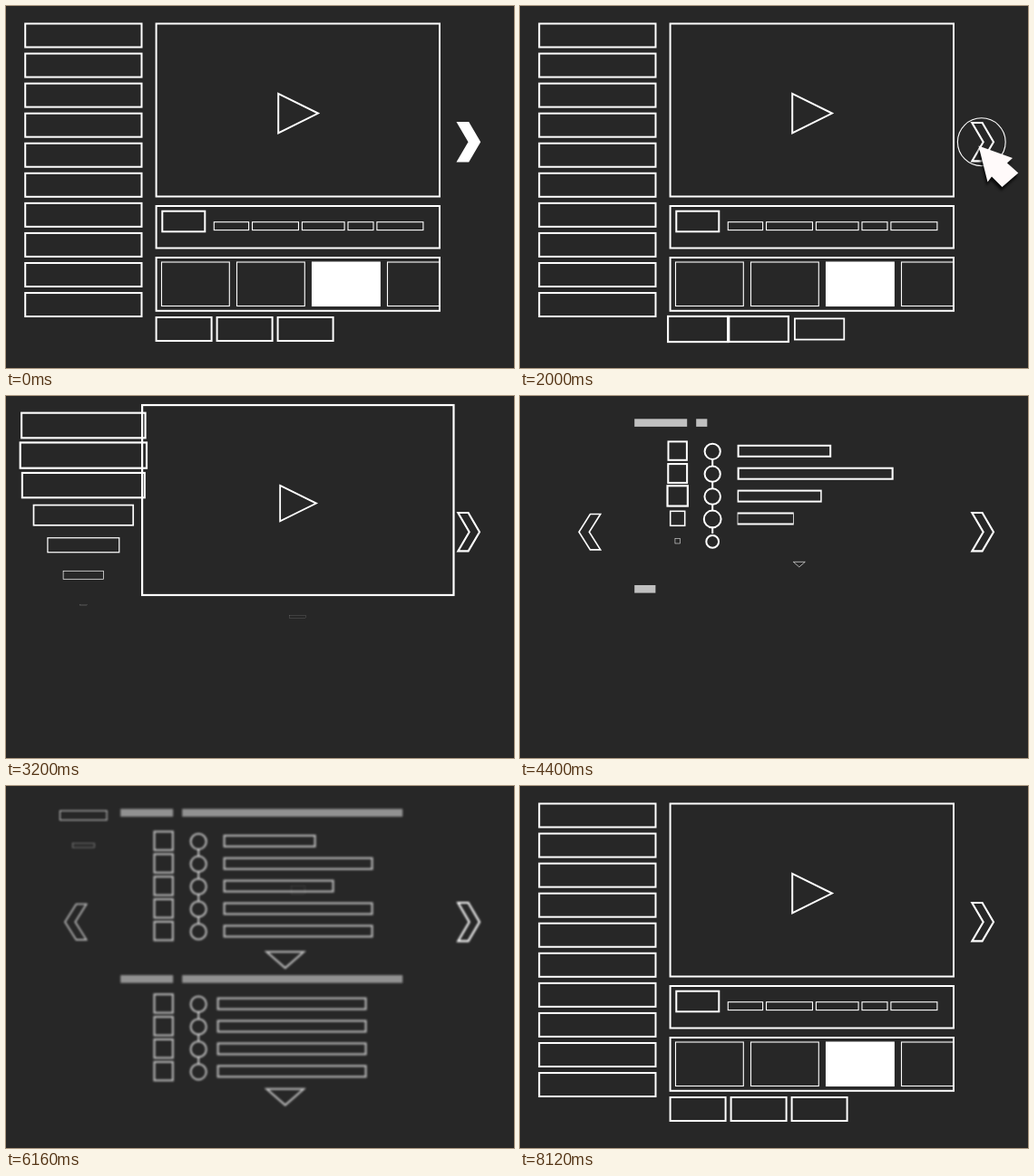
These frames come from a looping animation (560 by 400 pixels, 8.56 s). An HTML page with a canvas:

```html
<!DOCTYPE html>
<html lang="en">
<head>
<meta charset="utf-8">
<title>Wireframe transition</title>
<style>
  html, body { margin: 0; width: 100%; height: 100%; overflow: hidden; background: #272727; }
  canvas { display: block; width: 560px; height: 400px; }
</style>
</head>
<body>
<canvas id="stage" width="560" height="400"></canvas>
<script>
const LOOP = 8560;
const OUT = 67;    // stagger while the player leaves
const BACK = 46;   // stagger while it returns
const ROW = 110;   // stagger between list rows

const canvas = document.getElementById('stage');
const ctx = canvas.getContext('2d');

const clamp = v => Math.max(0, Math.min(1, v));
const ramp = (t, a, b) => clamp((t - a) / (b - a));
const smooth = p => p * p * (3 - 2 * p);
const mix = (a, b, p) => a + (b - a) * p;

// Grow past full size, then settle.
function grow(t, peak = 1.12, up = 240, end = 420) {
  if (t <= 0) return 0;
  return t < up ? peak * t / up : mix(peak, 1, ramp(t, up, end));
}

// Swell slightly, then collapse to nothing.
function shrink(t) {
  if (t <= 0) return 1;
  return t < 300 ? 1 + t / 3000 : 1.1 * (1 - Math.pow(ramp(t, 300, 606), 1.25));
}

function outline(points, width = 2, closed = true) {
  ctx.lineWidth = width;
  ctx.beginPath();
  points.forEach(([x, y]) => ctx.lineTo(x, y));
  if (closed) ctx.closePath();
  ctx.stroke();
}

function circle(x, y, r, width) {
  if (r < 0.1) return;
  ctx.lineWidth = width;
  ctx.beginPath();
  ctx.arc(x, y, r, 0, Math.PI * 2);
  ctx.stroke();
}

function scaled(x, y, sx, sy, draw) {
  if (sx < 0.004) return;
  ctx.save();
  ctx.translate(x, y);
  ctx.scale(sx, sy);
  draw();
  ctx.restore();
}

// Chevron pointing right (dir 1) or left (dir -1).
function chevron(tip, dir, half, width, filled) {
  const y = 150.2, back = tip - 23.7 * dir, bend = tip - 12.4 * dir;
  outline([[back, y - half], [bend, y - half], [tip, y], [bend, y + half],
           [back, y + half], [tip - 11.3 * dir, y]], width);
  if (filled) ctx.fill();
}

// ---- first page: player layout ----
const parts = [];
const box = (x, y, w, h, out, back, line = 2, fill = false) =>
  parts.push({ x: x + w / 2, y: y + h / 2, w, h, out, back, line, fill });

for (let i = 0; i < 10; i++) {
  box(21.2, 19.5 + i * 33.06, 128.3, 26, 3010 - i * OUT, 6075 + i * BACK);
}

// video, controls and strip of thumbnails
box(165.6, 19.5, 312.4, 191, 2900, 6151);
box(165.6, 221, 312.4, 46.5, 2608, 6300);
box(165.6, 278, 312.4, 58.8, 2484, 6500);

box(172.3, 226.7, 47, 22.6, 2367, 6350);
let left = 229.3;
[38.3, 51, 46.7, 28, 51].forEach((w, i) => {
  box(left, 238.7, w, 8.9, 2300 - i * OUT, 6396 + i * BACK, 1.1);
  left += w + 3.9;
});

for (let i = 0; i < 4; i++) {
  const x = 171.5 + i * 83, active = i === 2;
  box(x, 283, Math.min(74.8, 477.5 - x), 48.5,
      2233 - i * OUT, 6560 + i * BACK + (active ? 90 : 0), 1.1, active);
}
for (let i = 0; i < 3; i++) {
  box(165.6 + i * 67, 344, 61, 26, 1754 - i * OUT, 7330 + i * ROW);
}

const scaleAt = (t, out, back) => t < 5400 ? shrink(t - out) : grow(t - back);

function drawPlayer(t) {
  for (const { x, y, w, h, out, back, line, fill } of parts) {
    const s = scaleAt(t, out, back);
    scaled(x, y, s, s, () => {
      ctx.lineWidth = line;
      if (fill) ctx.fillRect(-w / 2, -h / 2, w, h);
      ctx.strokeRect(-w / 2, -h / 2, w, h);
    });
  }
  const s = scaleAt(t, 2826, 6200);
  scaled(322, 118.6, s, s, () => outline([[-21.8, -21.7], [22, 0], [-21.8, 21.7]]));
}

// ---- second page: two lists ----
const lists = [
  { y: 60.8, start: 3790, x: 240.6, bars: [100, 163, 120, 163, 163], head: 25.3, headStarts: [3650, 4383] },
  { y: 240.6, start: 4900, x: 233.6, bars: Array(4).fill(163), head: 209, headStarts: [4325, 4410] }
];

function drawHead({ head, headStarts }, t) {
  ctx.fillStyle = '#c0c0c0';
  [[126.2, 58, 190], [194.2, 243, 360]].forEach(([x, w, span], i) => {
    const p = ramp(t, headStarts[i], headStarts[i] + span);
    ctx.fillRect(x, head, w * p, 8.6);
  });
}

function drawList({ y, start, x, bars }, t) {
  bars.forEach((w, i) => {
    const cy = y + i * 24.9;
    const age = t - start - i * ROW;
    if (i && age > 0) outline([[212.2, cy - 16], [212.2, cy - 8.4]], 2, false);
    circle(212.2, cy + 0.5, grow(age) * 8.6, 2);

    const s = grow(age - 113);
    scaled(173.7, cy - 0.2, s, s, () => ctx.strokeRect(-10.2, -10.2, 20.4, 20.4));
    scaled(x - 1, cy, grow(age - 173, 1.05, 300, 500), 1, () => ctx.strokeRect(1, -6, w, 12));
  });
  const n = bars.length;
  const s = grow(t - start - 103 - n * ROW + (n - 4) * 110);
  scaled(307.8, y + n * 24.9 - 2 - (5 - n) * 3.4, s, s, () => outline([[-20.5, 0], [20.5, 0], [0, 17.8]]));
}

function drawLists(t) {
  const alpha = 1 - 0.3 * ramp(t, 5860, 6160) - 0.7 * ramp(t, 6160, 6560);
  if (t < 3600 || alpha <= 0) return;
  ctx.save();
  ctx.globalAlpha = alpha;
  for (const list of lists) {
    drawHead(list, t);
    drawList(list, t);
  }
  ctx.globalAlpha = alpha * ramp(t, 3700, 4300);
  chevron(65, -1, 19.7, 1.6);
  ctx.restore();
}

// ---- arrow, click ring and pointer ----
function drawArrow(t) {
  chevron(522, 1, 21.2, 2.1, t < 1900);
  circle(508.8, 150.2, 32 * (t < 1600 ? grow(t - 710) : shrink(t - 1600)), 1.1);
}

function drawPointer(t) {
  const alpha = ramp(t, 120, 280) * (1 - ramp(t, 2700, 2880));
  if (!alpha) return;
  const away = t < 1500 ? 1 - smooth(ramp(t, 120, 820)) : smooth(ramp(t, 2080, 2960)) * 0.92;
  ctx.save();
  ctx.globalAlpha = alpha;
  ctx.translate(mix(505.5, 496, away), mix(154.5, 344, away));
  ctx.shadowColor = 'rgba(0,0,0,.75)';
  ctx.shadowBlur = 3;
  ctx.shadowOffsetX = -1;
  ctx.shadowOffsetY = 4;
  ctx.fillStyle = '#fffafa';
  ctx.beginPath();
  [[0, 0], [37.5, 13.5], [31.5, 19], [43.8, 30], [26, 45.5], [14.5, 34], [10, 40]]
    .forEach(([x, y]) => ctx.lineTo(x, y));
  ctx.fill();
  ctx.restore();
}

function draw(t) {
  // The stage goes soft while the pages swap, then sharpens again.
  const blur = 1.5 * ramp(t, 5860, 6300) * (1 - ramp(t, 7320, 8040));
  canvas.style.filter = blur ? `blur(${blur.toFixed(2)}px)` : 'none';
  ctx.clearRect(0, 0, 560, 400);
  ctx.strokeStyle = ctx.fillStyle = '#fff';
  drawPlayer(t);
  drawLists(t);
  ctx.fillStyle = '#fff';
  drawArrow(t);
  drawPointer(t);
}

const begin = performance.now();
function tick() {
  draw((performance.now() - begin) % LOOP);
  requestAnimationFrame(tick);
}
tick();
</script>
</body>
</html>
```
